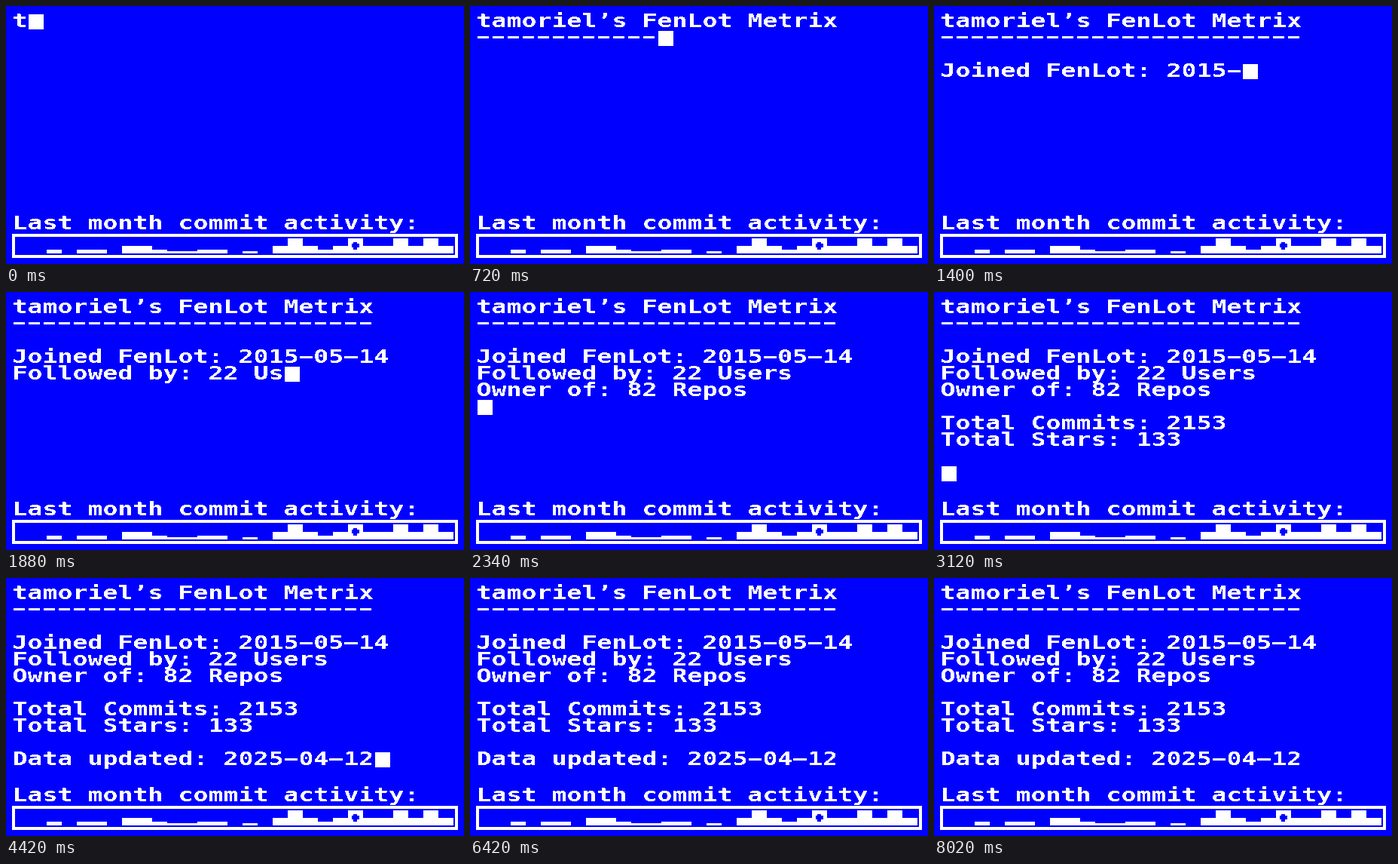
Recreate the animation shown at these times as an HTML page. Size 608 by 342 pixels, loop 8420 ms.

```html
<!DOCTYPE html>
<html lang="en">
<head>
<meta charset="utf-8">
<title>Commit metrics terminal</title>
<style>
  html, body { margin: 0; width: 100%; height: 100%; overflow: hidden; background: #00f; }
  svg { display: block; width: 100vw; height: 100vh; fill: #fff; }
  text { font: bold 24px "DejaVu Sans Mono", "Liberation Mono", monospace; white-space: pre; }
  rect, path { shape-rendering: crispEdges; }
</style>
</head>
<body>
<svg viewBox="0 0 608 342">
  <!-- Hard glyph edges, as on a bitmap terminal -->
  <filter id="hard" filterUnits="userSpaceOnUse" x="0" y="0" width="608" height="342"
          color-interpolation-filters="sRGB">
    <feComponentTransfer><feFuncA type="discrete" tableValues="0 1"/></feComponentTransfer>
  </filter>
  <rect width="608" height="342" fill="#00f"/>
  <g id="lines" filter="url(#hard)"></g>
  <path id="rule" stroke="#fff" stroke-width="3" stroke-dasharray="15 5"/>
  <rect id="cursor" width="20" height="20"/>
  <rect x="10" y="304" width="588" height="28" fill="none" stroke="#fff" stroke-width="4"/>
  <path id="bars"/>
  <path d="M461 313h5v2h3v5h-3v3h-5v-3h-2v-5h2z" fill="#00f"/>
</svg>
<script>
const LOOP = 8420, STEP = 20, BLINK = 400;
const LEFT = 10, TOP = 11, CELL = 20, LINE = 22, RULE = 1;
// Wide terminal face: a 24px glyph drawn on a 20px column.
const WIDEN = CELL / (24 * 0.602);

const script = [
  "tamoriel’s FenLot Metrix",
  "-".repeat(24),
  "",
  "Joined FenLot: 2015-05-14",
  "Followed by: 22 Users",
  "Owner of: 82 Repos",
  "",
  "Total Commits: 2153",
  "Total Stars: 133",
  "",
  "Data updated: 2025-04-12"
].join("\n");
const typingEnd = script.length * STEP;

const byId = id => document.getElementById(id);
const cursor = byId("cursor");

function addLine(baseline, content = "") {
  const line = document.createElementNS("http://www.w3.org/2000/svg", "text");
  line.setAttribute("transform", `translate(${LEFT - 1.5} ${baseline}) scale(${WIDEN} 1)`);
  line.textContent = content;
  byId("lines").append(line);
  return line;
}

const rows = script.split("\n").map((_, i) => addLine(TOP + 17 + i * LINE));
addLine(296, "Last month commit activity:");

// One digit per day, in eighths of a 20px cell.
byId("bars").setAttribute("d", [..."00202204421122010484248448484"]
  .map((level, i) => `M${14 + i * 20} 328v${-Math.ceil(level * 2.5)}h20V328z`).join(""));

function render(time) {
  const t = time % LOOP;
  const typed = script.slice(0, Math.floor(t / STEP) + 1).split("\n");
  const textOf = i => i === RULE ? "" : (typed[i] || "").replace(/-/g, "\u2212");
  rows.forEach((row, i) => {
    if (row.textContent !== textOf(i)) row.textContent = textOf(i);
  });
  const ruleLength = (typed[RULE] || "").length * CELL;
  byId("rule").setAttribute("d", `M${LEFT} ${TOP + RULE * LINE + 8.5}h${ruleLength}`);

  const last = typed.length - 1;
  cursor.setAttribute("x", LEFT + typed[last].length * CELL);
  cursor.setAttribute("y", TOP + last * LINE);
  const lit = t < typingEnd || Math.floor((t - typingEnd) / BLINK) % 2 === 0;
  cursor.setAttribute("visibility", lit ? "visible" : "hidden");
}

const start = performance.now();
function tick() {
  render(performance.now() - start);
  requestAnimationFrame(tick);
}
tick();
</script>
</body>
</html>
```
